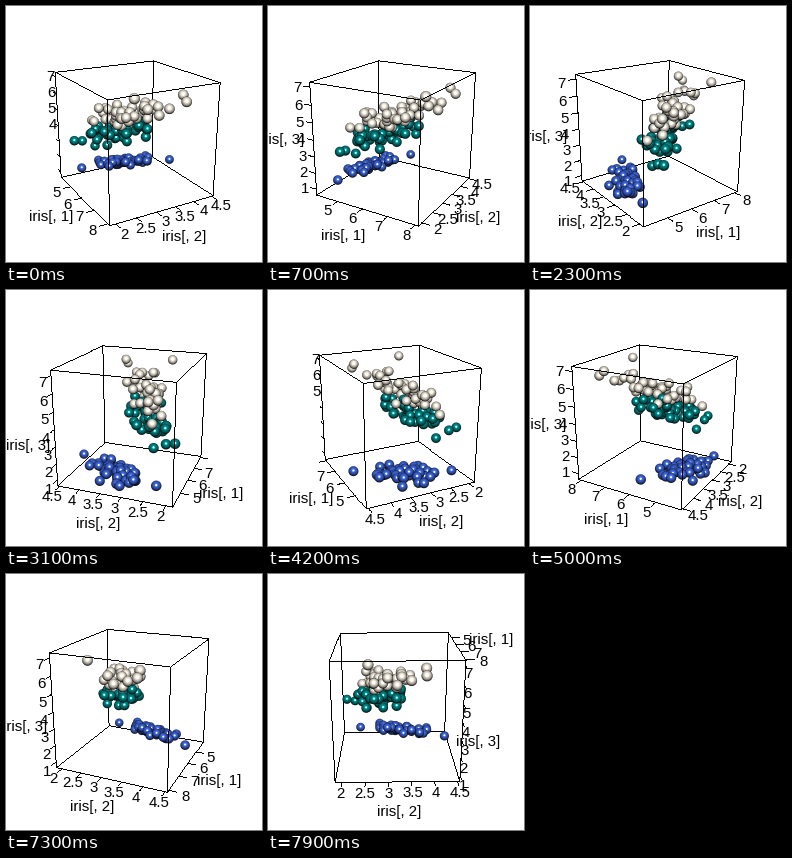
A matplotlib script that plays this animation: 256x256 px, repeating every 8000 ms.

```python
import itertools
import numpy as np
import matplotlib.pyplot as plt
from matplotlib.animation import FuncAnimation
from matplotlib.colors import to_rgb

SIZE, FRAMES, STEP = 256, 80, 100
START, SPEED = -60.3, 0.042           # degrees, degrees per ms
TILT = np.radians(20)
CAM = 8.256                           # camera distance in half box edges
FOCAL = SIZE / 2 / np.tan(np.radians(15))
BALL = 0.083                          # sphere radius in half box edges
TICK = 2 / 15
FAR_TEXT = -0.58                      # labels deeper than this are clipped

LO, HI = np.array([4.3, 2.0, 1.0]), np.array([7.9, 4.4, 6.9])
MID, HALF = (LO + HI) / 2, (HI - LO) / 2 * 1.126
TICKS = [np.arange(5, 9), np.arange(2, 4.6, 0.5), np.arange(1, 8)]
TITLES = [f"iris[, {i}]" for i in (1, 2, 3)]
SHARED = np.array([0.9, 0.65, 0.75])  # pull of the common size factor


def cloud(rng, mean, dev, extremes, count=50):
    """Correlated normal cloud plus a few extreme points."""
    n = count - len(extremes)
    size, own = rng.normal(size=(n, 1)), rng.normal(size=(n, 3))
    spread = SHARED * size + np.sqrt(1 - SHARED**2) * own
    pts = np.array(mean) + np.clip(spread, -1.9, 1.9) * dev
    return (np.vstack([extremes, pts.round(1)]) - MID) / HALF


rng = np.random.default_rng(7)
groups = {
    "royalblue": cloud(rng, (5.0, 3.43, 1.46), (.35, .36, .17),
                       [(4.5, 2.3, 1.3), (5.7, 4.4, 1.5)]),
    "darkcyan": cloud(rng, (5.94, 2.77, 4.3), (.51, .31, .45),
                      [(7.0, 3.2, 4.7), (5.0, 2.0, 3.5), (5.1, 2.5, 3.0)]),
    "oldlace": cloud(rng, (6.55, 2.95, 5.5), (.6, .31, .52),
                     [(7.9, 3.8, 6.4), (7.7, 3.8, 6.7), (7.7, 2.6, 6.9),
                      (4.9, 2.5, 4.5)]),
}
points = np.vstack(list(groups.values()))
colors = np.array([to_rgb(c) for c, pts in groups.items() for _ in pts])


def view(p, ang):
    """Eye coordinates: right, up, toward the viewer."""
    x, y, z = np.asarray(p, float).T
    c, s = np.cos(ang), np.sin(ang)
    away = x * s + y * c
    return (x * c - y * s,
            np.sin(TILT) * away + np.cos(TILT) * z,
            np.sin(TILT) * z - np.cos(TILT) * away)


def project(p, ang):
    right, up, near = view(p, ang)
    k = FOCAL / (CAM - near)
    return SIZE / 2 + k * right, SIZE / 2 - k * up, near, k


def toward(deg):
    return np.array([0, np.sin(np.radians(deg)), np.cos(np.radians(deg))])


LIGHT, GLINT = toward(15), toward(7.5)


def paint_balls(img, ang):
    """Shaded spheres, from back to front."""
    sx, sy, near, k = project(points, ang)
    for i in np.argsort(near):
        r = BALL * k[i]
        x0, y0 = int(sx[i] - r) - 1, int(sy[i] - r) - 1
        n = int(2 * r) + 4
        gy, gx = np.mgrid[y0:y0 + n, x0:x0 + n] + 0.5
        nx, ny = (gx - sx[i]) / r, (sy[i] - gy) / r
        rad = np.hypot(nx, ny)
        cover = np.clip((1 - rad) * r + 0.5, 0, 1)[..., None]
        fit = np.maximum(rad, 1)
        nx, ny = nx / fit, ny / fit
        nz = np.sqrt(np.clip(1 - nx**2 - ny**2, 0, 1))
        normal = np.stack([nx, ny, nz], -1)
        diffuse = np.clip(normal @ LIGHT, 0, 1)[..., None]
        shine = np.clip(normal @ GLINT, 0, 1)[..., None] ** 50
        rgb = np.clip(colors[i] * diffuse + shine, 0, 1)
        tile = img[y0:y0 + n, x0:x0 + n]
        tile += (rgb - tile) * cover


def paint_line(img, a, b, ang):
    """Hard black line, one pixel wide."""
    x, y, _, _ = project([a, b], ang)
    n = int(max(abs(np.diff(x)[0]), abs(np.diff(y)[0]))) + 2
    cols, rows = (np.linspace(*v, n).astype(int) for v in (x, y))
    inside = (cols >= 0) & (cols < SIZE) & (rows >= 0) & (rows < SIZE)
    img[rows[inside], cols[inside]] = 0


def find_edges(ang):
    """Box edges behind and before the spheres, and the edge of each axis."""
    flat = CAM * np.cos(TILT)
    eye = (-flat * np.sin(ang), -flat * np.cos(ang), CAM * np.sin(TILT))
    back, front, chosen = [], [], []
    for axis in range(3):
        end = np.eye(3)[axis]
        others = [i for i in range(3) if i != axis]
        outline = []
        for signs in itertools.product((-1, 1), repeat=2):
            edge = np.zeros(3)
            edge[others] = signs
            seen = sum(eye[i] * edge[i] > 1 for i in others)
            (front if seen else back).append((edge - end, edge + end))
            if seen == 1:
                outline.append(edge)

        def rank(edge):
            # farthest from the centre; ties go left or down
            right, up, _ = view(edge, ang)
            return round(right**2 + up**2, 6), -right if axis == 2 else -up

        chosen.append(max(outline, key=rank))
    return back, front, chosen


def label(p, text, ang):
    x, y, near, _ = project([p], ang)
    if near[0] > FAR_TEXT:
        ax.text(x[0], y[0] + 7, text, ha="center", va="baseline",
                family="Liberation Sans", size=15 * 0.72)


def draw_axis(img, axis, edge, ang):
    """Ticks, numbers and title along one box edge."""
    out, side = [(1, 2), (0, 2), (0, 1)][axis]
    push, nudge = edge * np.eye(3)[out], edge * np.eye(3)[side]
    for v in TICKS[axis]:
        p = edge.copy()
        p[axis] = (v - MID[axis]) / HALF[axis]
        paint_line(img, p, p + push * TICK, ang)
        label(p + push * 2 * TICK, f"{v:g}", ang)
    label(edge + push * 0.575 + nudge * TICK, TITLES[axis], ang)


fig = plt.figure(figsize=(2.56, 2.56), dpi=100, facecolor="white")
ax = fig.add_axes([0, 0, 1, 1])
scene = ax.imshow(np.ones((SIZE, SIZE, 3)), extent=(0, SIZE, SIZE, 0),
                  interpolation="nearest", aspect="auto")
ax.set(xlim=(0, SIZE), ylim=(SIZE, 0))
ax.axis("off")


def update(i):
    for text in list(ax.texts):
        text.remove()
    ang = np.radians(START + SPEED * i * STEP)
    img = np.ones((SIZE, SIZE, 3))
    back, front, chosen = find_edges(ang)
    for a, b in back:
        paint_line(img, a, b, ang)
    paint_balls(img, ang)
    for a, b in front:
        paint_line(img, a, b, ang)
    for axis, edge in enumerate(chosen):
        draw_axis(img, axis, edge, ang)
    scene.set_data(img)
    return []


anim = FuncAnimation(fig, update, frames=FRAMES, interval=STEP,
                     repeat=True, repeat_delay=0, blit=False)
plt.show()
```
